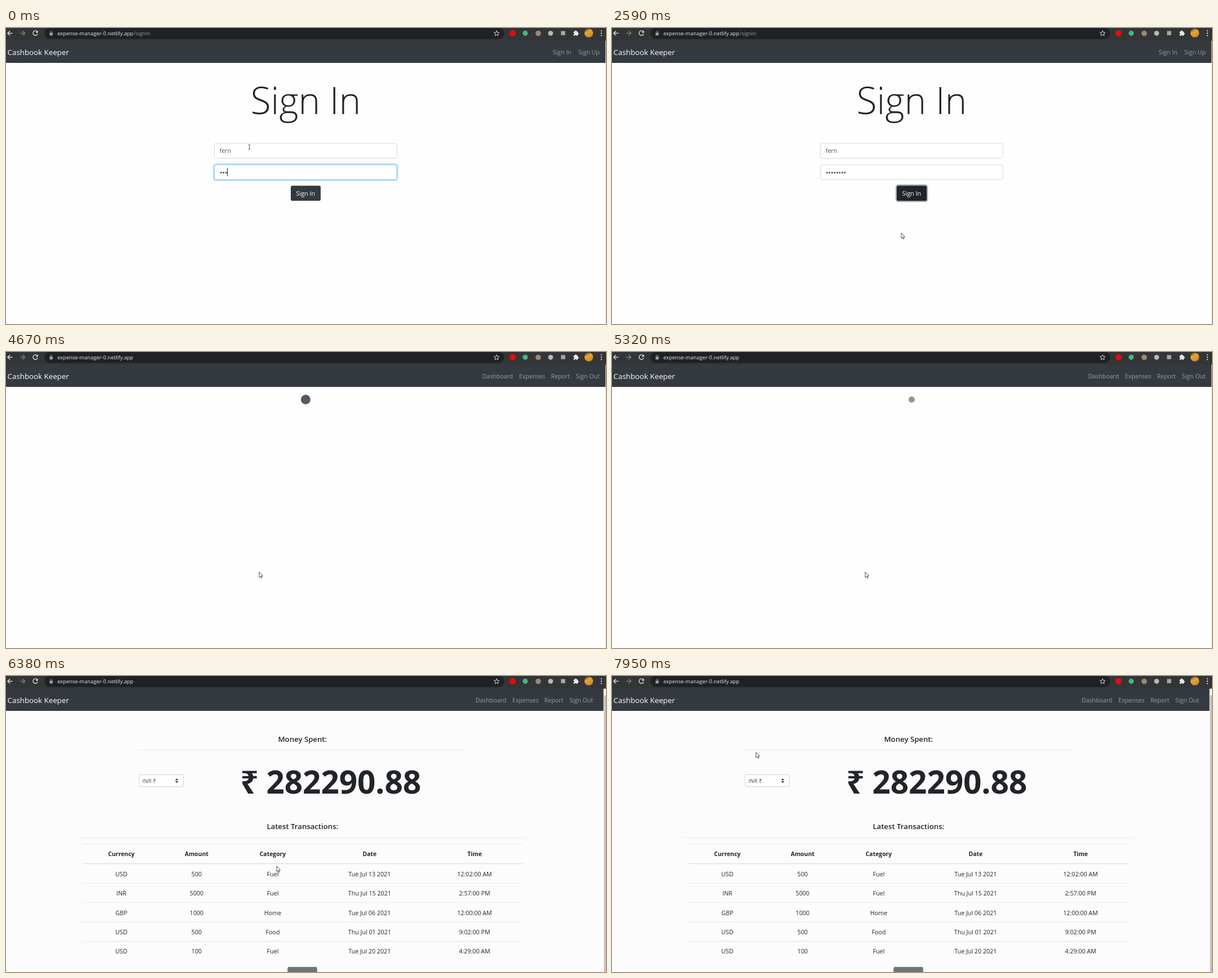
These frames come from a looping animation (1064 by 526 pixels, 8 s). An HTML page:

```html
<!DOCTYPE html>
<html lang="en">
<head>
<meta charset="utf-8">
<title>Cashbook Keeper</title>
<style>
  html, body { margin: 0; width: 100%; height: 100%; overflow: hidden; background: #fefefe; }
  svg { display: block; width: 1064px; height: 526px; }
  text { font-family: "Open Sans", "Noto Sans", "DejaVu Sans", sans-serif; white-space: pre; }
</style>
</head>
<body>
<svg id="stage" viewBox="0 0 1064 526" xmlns="http://www.w3.org/2000/svg"></svg>
<script>
const LOOP = 8000;
const INK = '#212529', NAV = '#343a40', MUTED = '#9a9da0', FIELD = '#495057';
const stage = document.getElementById('stage');

const attrs = o => Object.entries(o).map(([k, v]) => ` ${k}="${v}"`).join('');
const rect = (x, y, width, height, fill, more = {}) => `<rect${attrs({ x, y, width, height, fill, ...more })}/>`;
const circle = (cx, cy, r, fill, more = {}) => `<circle${attrs({ cx, cy, r, fill, ...more })}/>`;
const path = (d, more = {}) => `<path${attrs({ d, fill: 'none', ...more })}/>`;
const text = (s, x, y, size, fill, more = {}) =>
  `<text${attrs({ x, y, 'font-size': size, fill, ...more })}>${s}</text>`;
const centered = (s, x, y, size, fill, more = {}) => text(s, x, y, size, fill, { 'text-anchor': 'middle', ...more });
const group = (id, body, more = {}) => `<g${attrs({ id, ...more })}>${body}</g>`;
const rule = (x1, x2, y, color, width = 0.8) => path(`M${x1} ${y}H${x2}`, { stroke: color, 'stroke-width': width });
const links = items => items.map(([s, x]) => text(s, x, 46.8, 10.6, MUTED)).join('');

function signInPage() {
  const box = (y, more) => rect(369.5, y, 323.5, 26.5, '#fff',
    { rx: 2.8, stroke: '#ced4da', 'stroke-width': 0.9, ...more });
  const dots = Array.from({ length: 8 }, (_, i) =>
    circle(381.3 + 4.5 * i, 257, 1.55, FIELD, { class: 'dot' })).join('');
  return centered('Sign In', 531.5, 153, 65.5, INK, { 'font-weight': 300 }) +
    box(205) + text('fern', 378.8, 222.4, 10.6, FIELD) +
    rect(368.2, 241.6, 326.2, 29.2, 'none',
      { id: 'fieldRing', rx: 4, stroke: '#007bff', 'stroke-opacity': 0.25, 'stroke-width': 2.3 }) +
    box(243) + box(243, { id: 'fieldFocus', stroke: '#80bdff' }) + dots +
    rect(0, 248.5, 1, 15, '#111', { id: 'caret' }) +
    rect(503.9, 279.2, 55.2, 29, 'none',
      { id: 'buttonRing', rx: 3.8, stroke: '#a8abae', 'stroke-width': 2.3 }) +
    rect(505, 280.3, 53, 26.8, NAV, { id: 'button', rx: 2.8 }) +
    centered('Sign In', 531.3, 298.3, 10.8, '#fff');
}

function dashboardPage() {
  const columns = [204.5, 338, 473, 644.8, 831];
  const row = (cells, y, more) => cells.map((s, i) => centered(s, columns[i], y, 10.7, INK, more)).join('');
  const rows = [
    'USD|500|Fuel|Tue Jul 13 2021|12:02:00 AM',
    'INR|5000|Fuel|Thu Jul 15 2021|2:57:00 PM',
    'GBP|1000|Home|Tue Jul 06 2021|12:00:00 AM',
    'USD|500|Food|Thu Jul 01 2021|9:02:00 PM',
    'USD|100|Fuel|Tue Jul 20 2021|4:29:00 AM'
  ];
  const body = rows.map((r, i) => row(r.split('|'), 355.8 + 34.4 * i) +
    (i ? rule(135.5, 916, 333.9 + 34.4 * i, '#dee2e6') : '')).join('');
  const heading = (s, y) => centered(s, 525.8, y, 13.2, INK, { 'font-weight': 600 });
  return heading('Money Spent:', 117) + rule(236, 816, 131.7, '#e5e5e6') +
    rect(236, 175.4, 78.6, 21.4, '#fff', { rx: 2.8, stroke: '#c6ccd2', 'stroke-width': 0.9 }) +
    text('INR ₹', 241.8, 189.6, 9.8, FIELD) +
    path('M300 185.3L302.8 182L305.6 185.3ZM300 186.9L302.8 190.2L305.6 186.9Z', { fill: NAV }) +
    text('₹', 415.5, 209, 56.6, INK, { 'font-weight': 700 }) +
    text('282290.88', 461.5, 209, 56.6, INK, { 'font-weight': 700 }) +
    heading('Latest Transactions:', 272.3) + rule(125, 925, 287, '#e5e5e6') +
    rule(135.5, 916, 298.6, '#dee2e6') +
    row(['Currency', 'Amount', 'Category', 'Date', 'Time'], 320.2, { 'font-weight': 700, 'font-size': 10.4 }) +
    rule(135.5, 916, 333.4, '#dee2e6', 1.5) + body +
    rect(499.3, 517, 52.5, 27, '#6c757d', { rx: 2.8 }) +
    centered('See All', 525.6, 534.2, 10.7, '#fff');
}

function toolbar() {
  const line = (d, stroke, width = 1.3) => path(d, { stroke, 'stroke-width': width });
  const white = '#e8eaed', grey = '#9aa0a6';
  return rect(0, 0, 1064, 22.5, '#343536') +
    rect(68, -0.5, 815.5, 20, '#202124', { rx: 10 }) +
    line('M11.5 9.3H3.2M7 5.2L2.9 9.3L7 13.4', white) +
    line('M25 9.3H33.3M29.5 5.2L33.6 9.3L29.5 13.4', '#85878a') +
    line('M55.4 6.3A4.2 4.2 0 1 0 56.2 10.4', white) + path('M56.6 4.4V8.4H52.6Z', { fill: white }) +
    rect(77.3, 8.3, 5.6, 4.9, grey, { rx: 0.6 }) + line('M78.6 8.5V7.2A1.5 1.5 0 0 1 81.6 7.2V8.5', grey, 0.9) +
    text('expense-manager-0.netlify.app', 91, 12.8, 9.35, white) +
    text('/signin', 226.5, 12.8, 9.35, grey, { id: 'route' }) +
    line('M870 4.8L871.3 7.9L874.7 8.2L872.1 10.4L872.9 13.7L870 11.9L867.1 13.7L867.9 10.4L865.3 8.2L868.7 7.9Z', white, 0.9) +
    circle(898.4, 9.3, 5.6, '#e40d0d') + circle(920.8, 9.3, 4.6, '#41b883') +
    circle(943.8, 9.5, 4.8, '#9c8a74') + circle(965.8, 9.3, 4.4, '#b4b9bd') +
    rect(984.2, 5.4, 7.4, 7.4, '#a5a7aa') +
    rect(1006.4, 6.2, 7.6, 7.6, white, { rx: 0.8 }) + circle(1010.4, 5.8, 1.6, white) + circle(1014.2, 10, 1.6, white) +
    circle(1006.4, 10.2, 1.2, '#343536') + circle(1010.2, 13.8, 1.2, '#343536') +
    circle(1033.5, 9, 7.7, 'url(#avatar)') +
    [5, 9.2, 13.4].map(y => circle(1055.8, y, 1.1, white)).join('');
}

stage.innerHTML =
  `<defs><linearGradient id="avatar" x1="0" y1="0" x2=".5" y2="1"><stop offset="0" stop-color="#6a4a20"/>
   <stop offset=".45" stop-color="#eba52c"/><stop offset="1" stop-color="#c98a3c"/></linearGradient></defs>` +
  rect(0, 0, 1064, 526, '#fefefe', { id: 'paper' }) +
  group('scroller',
    rect(0, 20, 1064, 42, NAV) + text('Cashbook Keeper', 2.6, 48, 13.3, '#fff') +
    group('guestLinks', links([['Sign In', 969.6], ['Sign Up', 1015]])) +
    group('memberLinks', links([['Dashboard', 844.4], ['Expenses', 909.8], ['Report', 966.4], ['Sign Out', 1010.6]])) +
    group('signIn', signInPage()) + group('dashboard', dashboardPage())) +
  circle(531.4, 84.4, 11.3, INK, { id: 'spinner' }) +
  rect(1063, 22, 1, 504, '#dcdcdc', { id: 'edge' }) +
  group('scrollbar', rect(1059.5, 22, 4.5, 504, '#f1f1f1') +
    rect(1060.6, 34.5, 3.4, 500, '#c1c1c1', { id: 'thumb' })) +
  toolbar() +
  group('arrow', path('M0 0V9.6L2.2 7.6L3.7 10.8L5.2 10.1L3.8 7H6.6Z',
    { fill: '#fff', stroke: '#222', 'stroke-width': 0.8, 'stroke-linejoin': 'round' })) +
  group('beam', path('M-2 -3.9H-.5L0 -3.4L.5 -3.9H2M-2 3.9H-.5L0 3.4L.5 3.9H2M0 -3.5V3.5',
    { stroke: '#333', 'stroke-width': 0.8 })) +
  group('hand', path('M-1.6 2.2V-4Q-1.6 -5 -.8 -5T0 -4V-.8Q1.4 -1.4 1.6 -.3Q2.9 -.8 3.1 .3Q4.5 0 4.5 1.2V3.2Q4.5 5 3.4 6.8H-.6Q-1.4 4.8 -3.6 2.6Q-4 1.6 -3 1.4Q-2.2 1.4 -1.6 2.2Z',
    { fill: '#fff', stroke: '#222', 'stroke-width': 0.8, 'stroke-linejoin': 'round' }));

const part = Object.fromEntries([...stage.querySelectorAll('[id]')].map(e => [e.id, e]));
const dots = [...stage.querySelectorAll('.dot')];
const show = (el, on) => el.setAttribute('visibility', on ? 'inherit' : 'hidden');
const clamp = x => Math.min(1, Math.max(0, x));
const ramp = (t, from, to) => clamp((t - from) / (to - from));
const smooth = x => x * x * (3 - 2 * x);

// Pointer stops as [time, x, y]; equal positions hold, equal times jump.
const pointerPath = [
  [0, 431.5, 211.5], [1270, 431.5, 211.5], [1480, 470, 246], [1640, 522, 288], [1750, 539, 306],
  [2590, 539, 306], [2590, 513, 364], [2800, 496, 398], [3000, 477, 420], [3180, 458, 410], [3340, 450, 396],
  [3850, 450, 396], [3850, 449, 395], [4200, 449, 395], [4340, 449, 391], [5500, 449, 391],
  [5620, 451.5, 387], [6380, 451.5, 387], [6380, 480, 338], [6640, 480, 338],
  [6640, 588.8, 275.6], [7950, 588.8, 275.6], [7950, 255.3, 135.6], [8000, 255.3, 135.6]
];

function pointerAt(t) {
  const i = pointerPath.findIndex(p => p[0] > t);
  const [t0, x0, y0] = pointerPath[i - 1], [t1, x1, y1] = pointerPath[i];
  const k = ramp(t, t0, t1);
  return [x0 + (x1 - x0) * k, y0 + (y1 - y0) * k];
}

function drawPointer(t) {
  const [x, y] = pointerAt(t);
  const onForm = t < 2590;
  const onField = onForm && ((y > 204 && y < 232) || (y > 242 && y < 270));
  const shape = onField ? 'beam' : onForm && y > 280 ? 'hand' : 'arrow';
  for (const name of ['arrow', 'beam', 'hand']) show(part[name], name === shape);
  part[shape].setAttribute('transform', `translate(${x} ${y})`);
}

function drawForm(t) {
  const typed = 3 + (t >= 130) + (t >= 470) + 2 * (t >= 570) + (t >= 780);
  dots.forEach((d, i) => show(d, i < typed));
  show(part.caret, t < 1270 || (t >= 1790 && t < 1960));
  part.caret.setAttribute('x', 378.7 + 4.5 * typed);
  const moved = smooth(ramp(t, 1940, 2180));
  part.fieldRing.setAttribute('opacity', 1 - moved);
  part.fieldFocus.setAttribute('opacity', 1 - moved);
  part.buttonRing.setAttribute('opacity', moved);
  const hover = smooth(ramp(t, 1610, 1760));
  const mix = (a, b) => Math.round(a + (b - a) * hover);
  part.button.setAttribute('fill', `rgb(${mix(52, 33)},${mix(58, 37)},${mix(64, 41)})`);
}

function drawSpinner(t) {
  const clock = t < 4670 ? Math.min(t, 4470) : t;
  const phase = ((clock - (t < 5784 ? 4389 : 5784)) / 750) % 1;
  part.spinner.setAttribute('r', 11.3 * clamp(phase * 2));
  part.spinner.setAttribute('opacity', phase < 0.5 ? phase * 2 : 2 - phase * 2);
}

function render(t) {
  const member = t >= 4390, loaded = t >= 5960;
  const scroll = t >= 6880 && t < 7520 ? 3 : 0;
  show(part.signIn, !member);
  show(part.guestLinks, !member);
  show(part.memberLinks, member);
  show(part.spinner, member && !loaded);
  show(part.dashboard, loaded);
  show(part.scrollbar, loaded);
  show(part.edge, !loaded);
  show(part.route, t < 4670);
  part.paper.setAttribute('fill', loaded ? '#fcfcfc' : '#fefefe');
  part.memberLinks.setAttribute('transform', `translate(${loaded ? -11.7 : 0} 0)`);
  part.scroller.setAttribute('transform', `translate(0 ${-scroll})`);
  part.thumb.setAttribute('y', 34.5 + scroll);
  if (!member) drawForm(t);
  else if (!loaded) drawSpinner(t);
  drawPointer(t);
}

const start = performance.now();
function tick() {
  render((performance.now() - start) % LOOP);
  requestAnimationFrame(tick);
}
tick();
</script>
</body>
</html>
```
